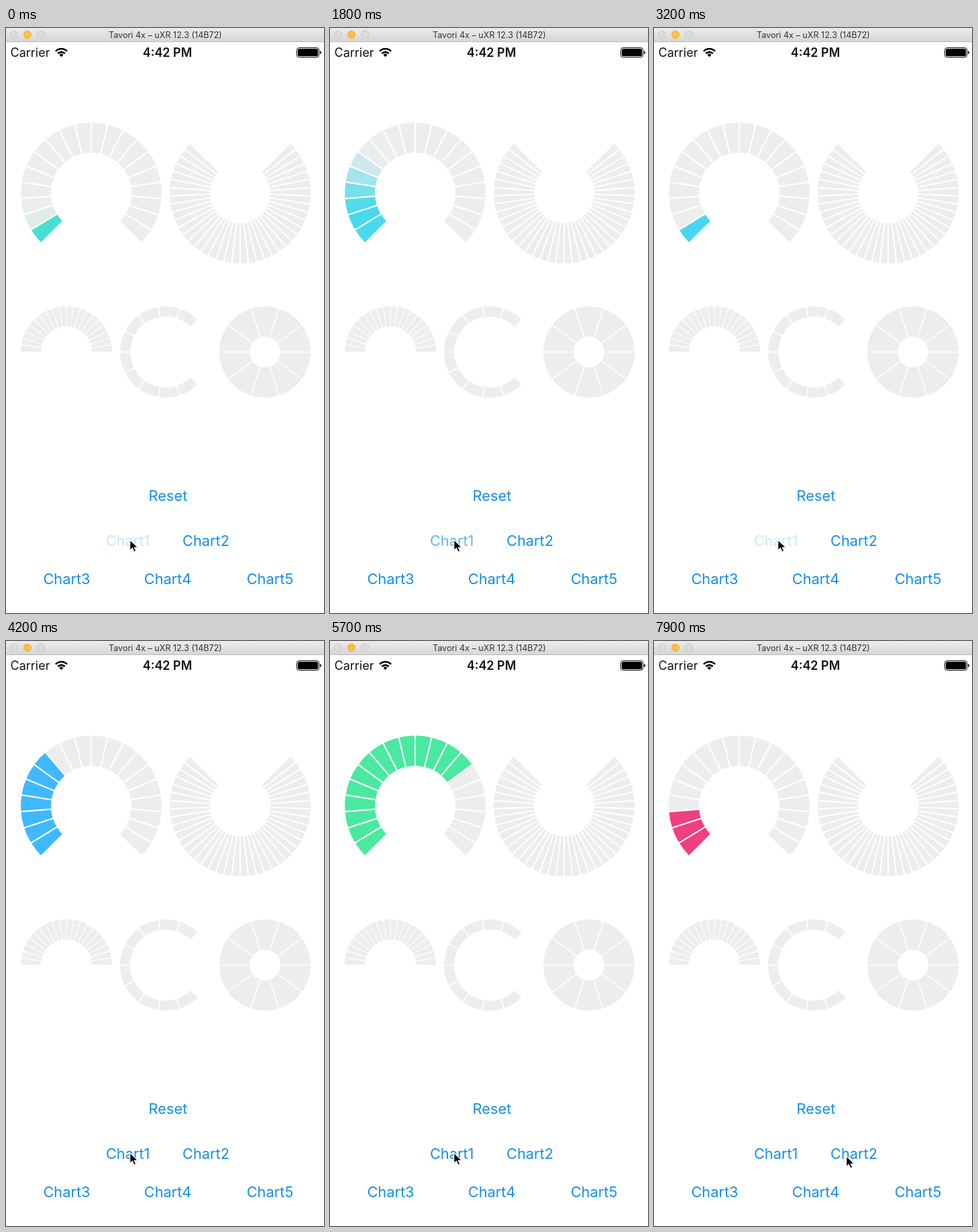
These frames come from a looping animation (474x872 px, 8 s). An HTML page:

```html
<!DOCTYPE html>
<html lang="en">
<head>
<meta charset="utf-8">
<title>Segmented charts</title>
<style>
  html, body { margin: 0; width: 100%; height: 100%; overflow: hidden; background: #fff; }
  svg { display: block; width: 100%; height: 100%; font-family: Inter, Roboto, sans-serif; }
  text { text-anchor: middle; }
  .button { font-size: 21.8px; fill: #148fe8; }
  .status { font-size: 18px; fill: #111; }
</style>
</head>
<body>
<svg id="stage" viewBox="0 0 474 872">
  <defs>
    <linearGradient id="bar" x1="0" y1="0" x2="0" y2="1">
      <stop offset="0" stop-color="#ececec"/>
      <stop offset="1" stop-color="#d6d6d6"/>
    </linearGradient>
  </defs>

  <rect width="474" height="20.5" fill="url(#bar)"/>
  <rect y="20" width="474" height="1" fill="#bcbcbc"/>
  <g stroke-width="1">
    <circle cx="12" cy="10" r="5.6" fill="#dcdcdc" stroke="#c4c4c4"/>
    <circle cx="32" cy="10" r="5.6" fill="#fdbe45" stroke="#eeb03a"/>
    <circle cx="52" cy="10" r="5.6" fill="#dcdcdc" stroke="#c4c4c4"/>
  </g>
  <text x="237.5" y="15" font-size="12.6" fill="#333">Tavori 4x – uXR 12.3 (14B72)</text>

  <text class="status" x="36" y="43">Carrier</text>
  <text class="status" x="240.5" y="43" font-weight="600">4:42 PM</text>
  <g fill="none" stroke="#000" stroke-width="2.6">
    <path d="M74 34.6a12 12 0 0 1 17 0"/>
    <path d="M77.3 38a7.4 7.4 0 0 1 10.4 0"/>
  </g>
  <path d="M82.5 43.2l-3-3.2a4.3 4.3 0 0 1 6 0z"/>
  <rect x="433.5" y="29.5" width="33" height="14" rx="3" fill="none" stroke="#000"/>
  <rect x="435" y="31" width="30" height="11" rx="1.5"/>
  <path d="M468 34q2 .5 2 2.5t-2 2.5z"/>

  <g id="charts"></g>
  <g id="buttons"></g>
  <path id="pointer" d="M0 0V15.6L3.6 12.2 6.2 18 8.9 16.8 6.4 11.2H11.4Z" stroke="#fff" stroke-width="1.1"/>
</svg>
<script>
const LOOP = 8000, STEP = 100;
const FADE = 270, STAGGER = 50;
const GREY = [237, 237, 237];
const GREEN = [74, 233, 160], CYAN = [72, 217, 236], BLUE = [64, 184, 255], PINK = [239, 64, 128];

// cx, cy, outer radius, inner radius, start angle, sweep, segments, gap
const CHARTS = [
  [127, 246, 105, 60, 135, 270, 20, 2.2],
  [349, 246, 105, 45, -45, 270, 40, 2],
  [90, 483, 68, 38, 180, 180, 20, 1.2],
  [238, 483, 68, 53, 45, 270, 10, 1.6],
  [386, 483, 68, 23, 0, 360, 10, 1.5]
];

const BUTTONS = [
  ["Reset", 241.5, 704.5], ["Chart1", 181.7, 772], ["Chart2", 298, 772],
  ["Chart3", 90.5, 829], ["Chart4", 241, 829], ["Chart5", 393.5, 829]
];

const TAPS = [
  { at: -100, count: 17, color: GREEN, last: CYAN },
  { at: 1475, count: 12, color: CYAN, last: GREEN },
  { at: 3150, count: 7, color: BLUE, last: CYAN },
  { at: 4710, count: 14, color: GREEN, last: BLUE },
  { at: 6000, count: 3, color: PINK, last: GREEN }
];

const clamp = x => Math.min(1, Math.max(0, x));
const smooth = x => x * x * (3 - 2 * x);
const mix = (a, b, k) => `rgb(${a.map((v, i) => Math.round(v + (b[i] - v) * k))})`;
const $ = id => document.getElementById(id);

function add(parent, tag, attrs) {
  const el = document.createElementNS("http://www.w3.org/2000/svg", tag);
  for (const key in attrs) el.setAttribute(key, attrs[key]);
  return parent.appendChild(el);
}

function polar(cx, cy, r, deg) {
  const a = deg * Math.PI / 180;
  return `${(cx + r * Math.cos(a)).toFixed(2)} ${(cy + r * Math.sin(a)).toFixed(2)}`;
}

function drawChart([cx, cy, outer, inner, start, sweep, n, gap]) {
  const at = (r, k) => polar(cx, cy, r, start + sweep * k / n);
  const segments = [];
  let gaps = "";
  for (let i = 0; i < n; i++) {
    segments.push(add($("charts"), "path", {
      d: `M${at(outer, i)}A${outer} ${outer} 0 0 1 ${at(outer, i + 1)}` +
         `L${at(inner, i + 1)}A${inner} ${inner} 0 0 0 ${at(inner, i)}Z`,
      fill: mix(GREY, GREY, 0)
    }));
  }
  for (let i = 0; i <= n; i++) gaps += `M${at(inner - 1, i)}L${at(outer + 1, i)}`;
  add($("charts"), "path", { d: gaps, stroke: "#fff", "stroke-width": gap });
  return segments;
}

const segments = CHARTS.map(drawChart)[0];
const labels = BUTTONS.map(([name, x, y]) => {
  const el = add($("buttons"), "text", { class: "button", x, y });
  el.textContent = name;
  return el;
});

function render(t) {
  const tap = TAPS.filter(e => e.at <= t).pop();
  const since = t - tap.at;

  // The first segment blends from the last colour; the rest restart from grey.
  segments.forEach((el, i) => {
    const k = i < tap.count ? smooth(clamp((since - i * STAGGER) / FADE)) : 0;
    el.setAttribute("fill", mix(i ? GREY : tap.last, tap.color, k));
  });

  labels[1].setAttribute("opacity", 0.2 + 0.8 * clamp((since - 80) / 430));

  const move = smooth(clamp((t - 7000) / 600));
  $("pointer").setAttribute("transform", `translate(${184.8 + 102 * move} ${763 + 5 * move})`);
}

let origin;
function tick(now) {
  origin ??= now;
  const t = (now - origin) % LOOP;
  render(Math.floor(t / STEP) * STEP);
  requestAnimationFrame(tick);
}
render(0);
requestAnimationFrame(tick);
</script>
</body>
</html>
```
